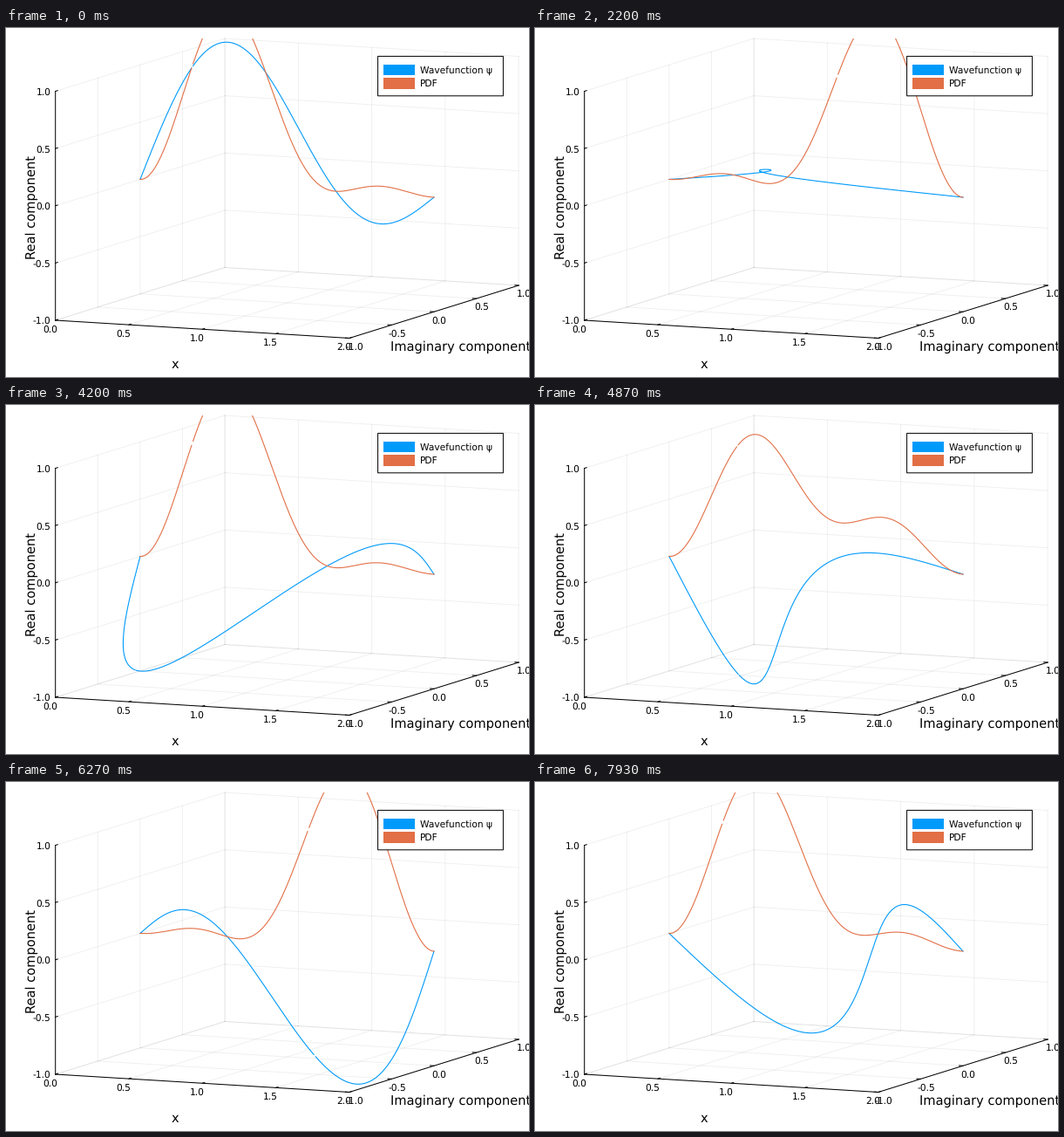
Animation of 600x400 px, one loop 8 s. Source, as a matplotlib script:

```python
import numpy as np
import matplotlib.pyplot as plt
from matplotlib.animation import FuncAnimation
from matplotlib.patches import Rectangle

W, H, DPI = 600, 400, 100
PX = 72 / DPI                 # points per pixel
STEP, LOOP = 20, 8000         # drawing step and loop length in ms
OMEGA = 0.033835              # ground-state phase per picture
BLUE, ORANGE = "#009afa", "#e26f46"

plt.rcParams["font.family"] = "DejaVu Sans"
plt.rcParams["text.hinting"] = "none"
fig = plt.figure(figsize=(W / DPI, H / DPI), dpi=DPI, facecolor="white")
ax = fig.add_axes([0, 0, 1, 1])
ax.set_xlim(0, W)
ax.set_ylim(H, 0)
ax.axis("off")


def project(x, im, re):
    """Orthographic view of (x, imaginary, real) in pixels."""
    return (153.9 + 168.55 * x + 97.2 * im,
            173.5 + 10.25 * x - 30.25 * im - 131.25 * re)


def segment(a, b, **style):
    (x0, y0), (x1, y1) = project(*a), project(*b)
    ax.plot([x0, x1], [y0, y1], snap=False, **style)


def label(x, y, text, size, **kw):
    kw = {"ha": "left", "va": "baseline", **kw}
    ax.text(x, y, text, fontsize=size * PX, color="black", **kw)


def draw_grid():
    style = dict(color="black", alpha=0.06, lw=1 * PX, zorder=1)
    xs, vs = np.linspace(0, 2, 5), np.linspace(-1, 1, 5)
    for x in xs:
        segment((x, -1, -1), (x, 1, -1), **style)
        segment((x, 1, -1), (x, 1, 1), **style)
    for v in vs:
        segment((0, v, -1), (2, v, -1), **style)
        segment((0, v, -1), (0, v, 1), **style)
        segment((0, -1, v), (0, 1, v), **style)
        segment((0, 1, v), (2, 1, v), **style)


def draw_axes():
    style = dict(color="black", lw=1 * PX, zorder=2)
    segment((0, -1, -1), (0, -1, 1), **style)
    segment((0, -1, -1), (2, -1, -1), **style)
    segment((2, -1, -1), (2, 1, -1), **style)
    tick = 0.026
    for k in range(5):
        x, v = k / 2, k / 2 - 1
        segment((0, -1, v), (0, -1 + tick, v), **style)
        segment((x, -1, -1), (x, -1 + tick, -1), **style)
        segment((2, v, -1), (2 - tick, v, -1), **style)
        label(51.3, 339.2 - 65.6 * k, f"{v:.1f}", 10.67, ha="right")
        label(50.5 + 84.25 * k, 348.9 + 5.1 * k, f"{x:.1f}", 10.67,
              ha="center")
        label(400 + 48.5 * k, 368.6 - 15.1 * k, f"{v:.1f}", 10.67,
              ha="center")
    label(194.2, 390.3, "x", 14.67, ha="center")
    label(440.6, 370.3, "Imaginary component", 14.67)
    label(33.7, 264.7, "Real component", 14.67, rotation=90,
          rotation_mode="anchor")


def draw_legend():
    ax.add_patch(Rectangle((426.6, 32.4), 143.8, 45.4, fc="white",
                           ec="black", lw=1 * PX, snap=False, zorder=5))
    rows = [("Wavefunction ψ", BLUE, 41.5), ("PDF", ORANGE, 57)]
    for text, color, top in rows:
        ax.add_patch(Rectangle((433, top), 36, 12.5, fc=color, ec="none",
                               zorder=6))
        label(474.7, top + 10.4, text, 10.67, zorder=6)


draw_grid()
draw_axes()
draw_legend()

view = Rectangle((0, 11.7), W, H, transform=ax.transData)
wave, = ax.plot([], [], color=BLUE, lw=1.1 * PX, zorder=3)
pdf, = ax.plot([], [], color=ORANGE, lw=1.1 * PX, zorder=4)
for curve in (wave, pdf):
    curve.set_clip_path(view)

x = np.linspace(0, 2, 201)
S1, S2 = np.sin(np.pi * x / 2), np.sin(np.pi * x)


def trace(line, im, re):
    """Plot a curve, dropping each step that leaves the unit box."""
    inside = (np.abs(im) <= 1) & (np.abs(re) <= 1)
    exits = np.flatnonzero(inside[:-1] & ~inside[1:]) + 1
    px, py = project(x, im, re)
    line.set_data(np.insert(px, exits, np.nan), np.insert(py, exits, np.nan))


def update(step):
    # three pictures per 200 ms, changing at 60, 120 and 200 ms
    phase = OMEGA * ((3 * step + 2) // 10)
    psi = (S1 * np.exp(-1j * phase) + S2 * np.exp(-4j * phase)) / np.sqrt(2)
    trace(wave, psi.imag, psi.real)
    trace(pdf, 0 * x, np.abs(psi) ** 2)
    return wave, pdf


anim = FuncAnimation(fig, update, frames=LOOP // STEP, interval=STEP,
                     repeat=True, repeat_delay=0, blit=False)
plt.show()
```
